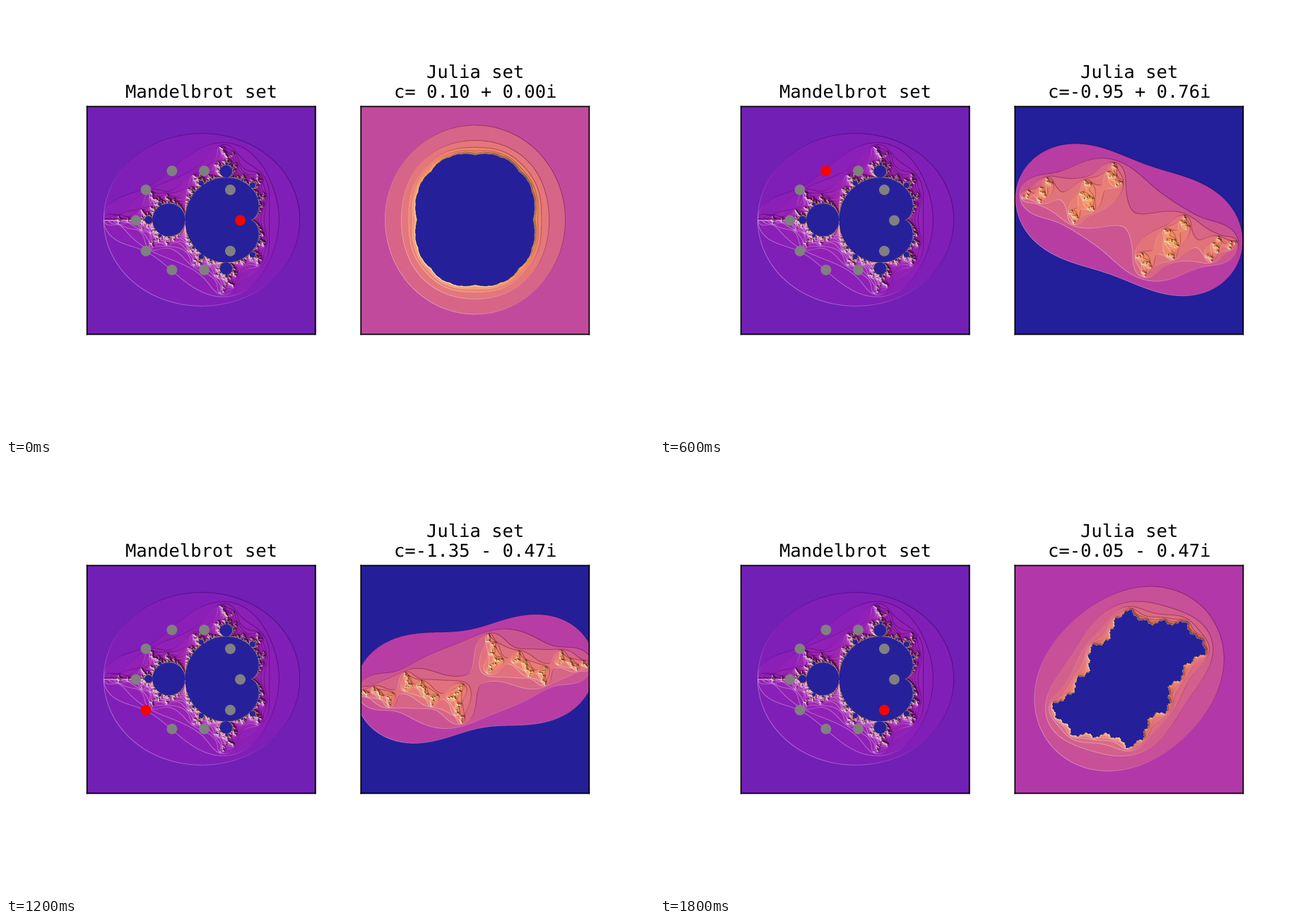
These frames come from a looping animation (917x611 px, 2 s). A matplotlib script:

```python
import numpy as np
import matplotlib.pyplot as plt
from matplotlib.animation import FuncAnimation
from matplotlib.colors import LightSource, PowerNorm

W, H, DPI = 917, 611, 128
UNIT = 152.8 / DPI          # size of one layout point in figure points
STEPS, STEP_MS = 10, 200
GRID, MAX_ITER, HALF = 1000, 400, 1.75
MANDEL_CENTER = -0.5

plt.rcParams.update({
    "font.family": "DejaVu Sans Mono",
    "text.hinting": "none",
    "axes.titlesize": 12 * UNIT,
    "axes.titlepad": 6 * UNIT,
    "axes.linewidth": 0.8 * UNIT,
})

light = LightSource(azdeg=315, altdeg=10)


def lower_half(center=0.0):
    """Lower half of a square grid around a point of the real axis."""
    side = np.linspace(-HALF, HALF, GRID)
    return side + center + 1j * side[:GRID // 2, None]


def escape_counts(start, c):
    """Steps of z*z + c until |z| > 2; zero where z stays bounded."""
    z = start.ravel()
    c = np.broadcast_to(c, start.shape).ravel()
    alive = np.arange(z.size)
    counts = np.zeros(z.size)
    for n in range(1, MAX_ITER):
        z = z * z + c
        out = z.real**2 + z.imag**2 > 4
        if out.any():
            counts[alive[out]] = n
            keep = ~out
            z, c, alive = z[keep], c[keep], alive[keep]
            if not alive.size:
                break
    return counts.reshape(start.shape)


def julia_counts(c):
    half = escape_counts(lower_half(), c)
    return np.vstack([half, half[::-1, ::-1]])   # z and -z behave alike


def mandel_counts():
    grid = lower_half(MANDEL_CENTER)
    half = escape_counts(grid, grid)
    return np.vstack([half, half[::-1]])


def relief(counts):
    """Colour the counts and light them as a height field."""
    rgba = light.shade(counts, cmap=plt.cm.plasma, norm=PowerNorm(0.3),
                       vert_exag=1.5, blend_mode="hsv")
    return (rgba * 255).round().astype(np.uint8)


def show(ax, pixels, center=0.0):
    extent = (center - HALF, center + HALF, -HALF, HALF)
    image = ax.imshow(pixels, origin="lower", extent=extent)
    ax.set(xticks=[], yticks=[])
    ax.autoscale(False)
    for spine in ax.spines.values():
        spine.set_snap(False)
    return image


def julia_title(c):
    sign = "-" if c.imag < 0 else "+"
    return f"Julia set\nc={c.real:5.2f} {sign} {abs(c.imag):.2f}i"


def dot_colors(step):
    return ["red" if k == step else "gray" for k in range(STEPS)]


points = -0.7 + 0.8 * np.exp(2j * np.pi * np.arange(STEPS) / STEPS)

# Conjugate values of c give vertically mirrored counts.
counts = [julia_counts(c) for c in points[:STEPS // 2 + 1]]
counts += [k[::-1] for k in counts[-2:0:-1]]
julia_pixels = [relief(k) for k in counts]

fig, (ax_m, ax_j) = plt.subplots(
    1, 2, figsize=(W / DPI, H / DPI), dpi=DPI,
    gridspec_kw=dict(left=0.125, right=0.9, bottom=0.125, top=0.88,
                     wspace=0.2))
fig.patch.set_facecolor("white")

show(ax_m, relief(mandel_counts()), MANDEL_CENTER)
ax_m.set_title("Mandelbrot set")
dots = ax_m.scatter(points.real, points.imag, s=(6 * UNIT)**2,
                    c=dot_colors(0), linewidths=UNIT)

julia = show(ax_j, julia_pixels[0])
title = ax_j.set_title(julia_title(points[0]))


def update(step):
    dots.set_color(dot_colors(step))
    julia.set_data(julia_pixels[step])
    title.set_text(julia_title(points[step]))
    return dots, julia, title


anim = FuncAnimation(fig, update, frames=STEPS, interval=STEP_MS,
                     repeat=True, repeat_delay=0, blit=False)
plt.show()
```
